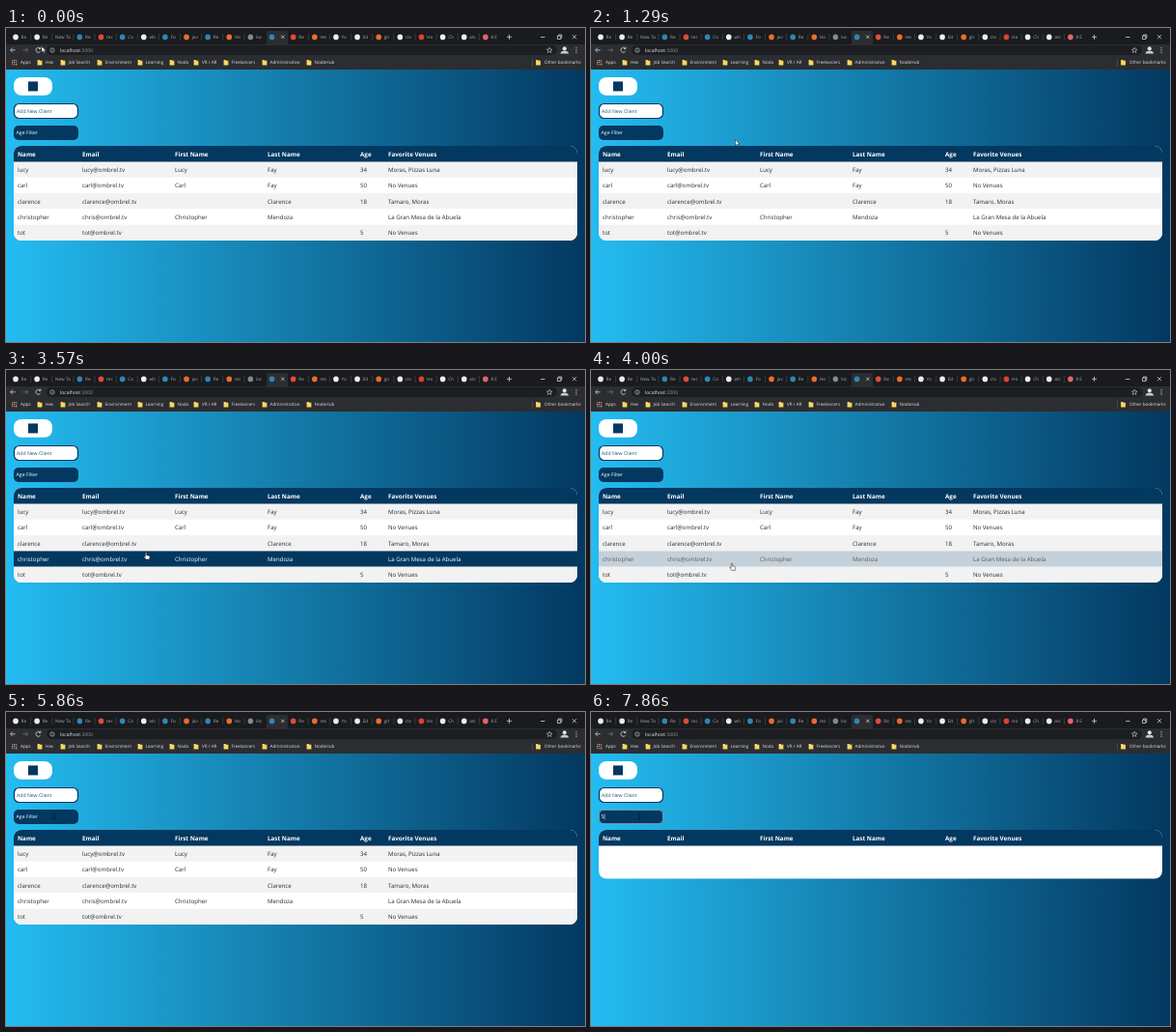
Recreate the animation shown at these times as an HTML page. Size 600 px wide and 325 px high, loop 8000 ms.

```html
<!DOCTYPE html>
<html lang="en">
<head>
<meta charset="utf-8">
<title>Clients</title>
<style>
  html, body { margin: 0; width: 100%; height: 100%; overflow: hidden; background: #202124; }
  svg { display: block; width: 600px; height: 325px; }
  text { font-family: "Open Sans", "Noto Sans", sans-serif; font-size: 6.1px; text-rendering: geometricPrecision; white-space: pre; }
  .tab { font-size: 4.7px; fill: #a4a8ad; }
  .mark { font-size: 4.6px; fill: #dfe1e5; }
  .url { font-size: 5.05px; fill: #e8eaed; }
  .field { font-size: 5.15px; }
  .head text { font-weight: 700; font-size: 6.3px; fill: #fff; }
  .line { fill: none; stroke: #d0d3d7; stroke-width: .8; }
</style>
</head>
<body>
<svg viewBox="0 0 600 325">
  <defs>
    <linearGradient id="sky">
      <stop offset="0" stop-color="#24bcf1"/>
      <stop offset="1" stop-color="#033860"/>
    </linearGradient>
    <clipPath id="card"><rect id="cardBox" x="8" y="122" width="584" height="98" rx="8"/></clipPath>
  </defs>

  <!-- browser -->
  <rect width="600" height="43" fill="#2c2d30"/>
  <rect width="600" height="17" fill="#1a1b1e"/>
  <path d="M268 17q2 0 2-2V5q0-2 2-2h18q2 0 2 2v10q0 2 2 2z" fill="#2c2d30"/>
  <g id="tabs"></g>
  <path class="line" d="M285.200 7.700l3.200 3.200m0-3.200l-3.200 3.200M519 9.300h5m-2.500-2.500v5M554 9.500h4.500M571.500 8.200h3.300v3.300h-3.300zm1-.2v-1h3.300v3.300h-1M587 7.200l4 4m0-4l-4 4"/>
  <path class="line" d="M9.700 22.800h-5m2.200-2.300l-2.300 2.300 2.300 2.300"/>
  <path class="line" d="M17.500 22.800h5m-2.200-2.300l2.300 2.300-2.300 2.300" opacity=".4"/>
  <path class="line" d="M35.500 21.300a2.500 2.500 0 1 0 .2 2.600M35.900 19.500v2h-2"/>
  <rect x="42" y="18" width="529" height="10" rx="5" fill="#1d1e21"/>
  <circle class="line" cx="48" cy="23" r="2.200" style="stroke-width:.6"/>
  <path class="line" d="M48 22.700v1.500M48 21.500v.5" style="stroke-width:.6"/>
  <text class="url" x="56" y="24.800">localhost<tspan fill="#8f949a">:3000</tspan></text>
  <path class="line" d="M563.200 20.200l.8 1.900 2 .1-1.600 1.300.6 2-1.800-1.100-1.800 1.100.6-2-1.600-1.300 2-.1z" style="stroke-width:.6"/>
  <path d="M574.500 26.500q.5-3 4.300-3t4.300 3z" fill="#c9cccf"/>
  <circle cx="578.800" cy="21.300" r="2" fill="#e4e6e8"/>
  <g fill="#d0d3d7"><circle cx="591" cy="20.600" r=".6"/><circle cx="591" cy="22.900" r=".6"/><circle cx="591" cy="25.200" r=".6"/></g>
  <g id="marks"></g>
  <path d="M545.500 32v8" stroke="#56585c" stroke-width=".6"/>

  <!-- page -->
  <rect y="43" width="600" height="282" fill="url(#sky)"/>
  <rect x="8" y="51" width="40" height="18.800" rx="8" fill="#fff"/>
  <rect x="23" y="55.400" width="10" height="10" fill="#033860"/>
  <rect x="8.500" y="78.500" width="66" height="15" rx="5" fill="#fff" stroke="#033860" stroke-width="1.200"/>
  <text class="field" x="11" y="88" fill="#1d5985">Add New Client</text>
  <rect x="8" y="101" width="67" height="15" rx="5" fill="#033860"/>
  <rect id="focus" x="8.400" y="101.400" width="66.200" height="14.200" rx="4.700" fill="none" stroke="#a9cbe0" stroke-width=".7"/>
  <text id="filter" class="field" x="10.600" y="110.300" fill="#fff"></text>
  <path id="caret" d="M0 105.600v5.800" stroke="#fff" stroke-width=".6"/>

  <g clip-path="url(#card)">
    <rect x="8" y="122" width="584" height="98" fill="#fff"/>
    <g id="rows"></g>
    <rect x="8" y="122" width="584" height="16.500" fill="#033860"/>
    <g id="head" class="head"></g>
  </g>

  <g id="pointer">
    <path data-kind="arrow" d="M0 0v6.200l1.500-1.300 1 2.100 1-.5-1-2h2z" fill="#fff" stroke="#111" stroke-width=".5"/>
    <path data-kind="hand" d="M-.6 .2q.7-.7 1.300 0v2.500l2.700.6q.8.300.7 1.200l-.5 2.500H0L-2 4.300q0-.9.9-.5l.5.5z" fill="#fff" stroke="#111" stroke-width=".5"/>
    <path data-kind="beam" d="M-1.200-3.200q1.200 0 1.200.7v5q0 .7-1.200.7M1.200-3.200q-1.200 0-1.200.7M0 2.500q0 .7 1.200.7" fill="none" stroke="#06121c" stroke-width=".7"/>
  </g>
</svg>

<script>
const LOOP = 8000, FPS = 7, FADE = 200;
const ROW_TOP = 138.5, ROW_H = 16.3;
const NAVY = [3, 56, 96], WHITE = [255, 255, 255], INK = [38, 42, 46];
const $ = id => document.getElementById(id);
const label = (x, y, str, cls = '') => `<text class="${cls}" x="${x}" y="${y}">${str}</text>`;

// tabs: label and icon colour
const react = '#2f86b5', mail = '#e24a3b', stack = '#ee6c2c', pale = '#eceef0', red = '#e0402f';
const tabs = [
  ['Re', pale], ['Re', pale], ['New To'], ['Re', react], ['tec', mail], ['Co', react],
  ['wh', pale], ['Fo', react], ['jav', stack], ['Re', react], ['Ho', stack], ['loc', '#85898e'],
  ['', react], ['Re', mail], ['res', stack], ['Yo', pale], ['Ed', pale], ['git', stack],
  ['ctv', pale], ['Ho', red], ['Ch', pale], ['atc', pale], ['8 E', '#e8636b']
];
$('tabs').innerHTML = tabs.map(([name, color], i) => {
  const x = 10 + 22.13 * i;
  const icon = color ? `<circle cx="${x}" cy="9.400" r="2.800" fill="${color}"/>` : '';
  const bar = i && i !== 12 && i !== 13 ? `<path d="M${x - 6.5} 6v7" stroke="#54565a" stroke-width=".5"/>` : '';
  return icon + bar + label(color ? x + 5.6 : x - 3.3, 11.1, name, 'tab');
}).join('');

// bookmarks: icon x, text x, label
const marks = [
  [35, 41, 'Hex'], [59, 64.5, 'Job Search'], [97, 102.5, 'Environment'], [139, 144.5, 'Learning'],
  [172, 177.5, 'Nodo'], [197, 203, 'VR / AR'], [228, 233.5, 'Freelancers'],
  [268, 273.5, 'Administrativo'], [314, 319.5, 'NodoHub'], [551.5, 558, 'Other bookmarks']
];
let dots = '';
for (let i = 0; i < 9; i++) {
  const color = ['#e2574c', '#f2b632', '#4a90e2'][(i + (i / 3 | 0)) % 3];
  dots += `<rect x="${6 + i % 3 * 2}" y="${33 + (i / 3 | 0) * 2}" width="1.300" height="1.300" fill="${color}"/>`;
}
$('marks').innerHTML = dots + label(15, 37.3, 'Apps', 'mark') + marks.map(([x, tx, name]) =>
  `<path d="M${x - 2.4} 33h2l.7.800h2.100v4.700h-4.800z" fill="#fbd75f"/>` + label(tx, 37.3, name, 'mark')).join('');

// table
const cols = [12, 79, 175, 271, 367, 396];
const cells = (list, y) => list.map((str, i) => str && label(cols[i], y, str)).join('');
const clients = [
  ['lucy', 'lucy@ombrel.tv', 'Lucy', 'Fay', '34', 'Moras, Pizzas Luna'],
  ['carl', 'carl@ombrel.tv', 'Carl', 'Fay', '50', 'No Venues'],
  ['clarence', 'clarence@ombrel.tv', '', 'Clarence', '18', 'Tamaro, Moras'],
  ['christopher', 'chris@ombrel.tv', 'Christopher', 'Mendoza', '', 'La Gran Mesa de la Abuela'],
  ['tot', 'tot@ombrel.tv', '', '', '5', 'No Venues']
];
$('head').innerHTML = cells(['Name', 'Email', 'First Name', 'Last Name', 'Age', 'Favorite Venues'], 132.7);
$('rows').innerHTML = clients.map((c, i) => {
  const y = ROW_TOP + i * ROW_H;
  return `<g><rect x="8" y="${y}" width="584" height="${ROW_H}"/>${cells(c, y + 10.5)}</g>`;
}).join('');
const rows = [...$('rows').children];

// pointer path: time, x, y
const path = [
  [0, 37, 19], [140, 37, 19], [570, 120, 150], [860, 150, 208], [1290, 149.5, 115.5],
  [1700, 150, 208], [2290, 148.5, 165], [2570, 148, 208], [3000, 146, 150], [3300, 145, 190],
  [3570, 145, 189], [3900, 146, 210], [4300, 145, 148], [4570, 145, 147.5], [4850, 145, 205],
  [5250, 130, 150], [5570, 62, 100], [5860, 50, 108], [LOOP, 50, 108]
];
function pointerAt(t) {
  t = Math.max(0, t);
  const i = Math.max(1, path.findIndex(p => p[0] >= t));
  const [t0, x0, y0] = path[i - 1], [t1, x1, y1] = path[i];
  const p = (t - t0) / (t1 - t0), k = p * p * (3 - 2 * p);
  return [x0 + (x1 - x0) * k, y0 + (y1 - y0) * k];
}
const rowAt = t => Math.floor((pointerAt(t)[1] - ROW_TOP) / ROW_H);

// rows fade in on hover and clear at once
function hoverAmount(t) {
  const row = rowAt(t);
  let age = 0;
  while (age < FADE && rowAt(t - age) === row) age += 5;
  return 1 - (1 - age / FADE) ** 2;
}
const mix = (a, b, k) => `rgb(${a.map((v, i) => Math.round(v + (b[i] - v) * k))})`;
const show = (el, on) => el.setAttribute('visibility', on ? 'visible' : 'hidden');

function draw(t) {
  const [x, y] = pointerAt(t), hot = rowAt(t), amount = hoverAmount(t);
  const focused = t >= 5995, typed = t >= 7425, empty = t >= 7565;

  rows.forEach((g, i) => {
    const k = i === hot ? amount : 0;
    g.firstChild.setAttribute('fill', mix(i % 2 ? WHITE : [242, 242, 242], NAVY, k));
    g.setAttribute('fill', mix(INK, WHITE, k));
  });
  show($('rows'), !empty);
  $('cardBox').setAttribute('height', empty ? 50.5 : 98);

  show($('focus'), focused);
  $('filter').textContent = typed ? '5' : 'Age Filter';
  show($('caret'), focused && !(t >= 6425 && t < 6995));
  $('caret').setAttribute('transform', `translate(${typed ? 14 : 10.5})`);

  const inField = x > 8 && x < 75;
  const kind = inField && y > 101 && y < 116 ? 'beam'
    : hot >= 0 || (inField && y > 78 && y < 94) ? 'hand' : 'arrow';
  $('pointer').setAttribute('transform', `translate(${x} ${y})`);
  for (const el of $('pointer').children) show(el, el.dataset.kind === kind);
}

function tick() {
  const t = performance.now() % LOOP;
  const step = Math.floor((t + 5) * FPS / 1000) % (LOOP / 1000 * FPS);
  draw(step * 1000 / FPS);
  requestAnimationFrame(tick);
}
tick();
</script>
</body>
</html>
```
